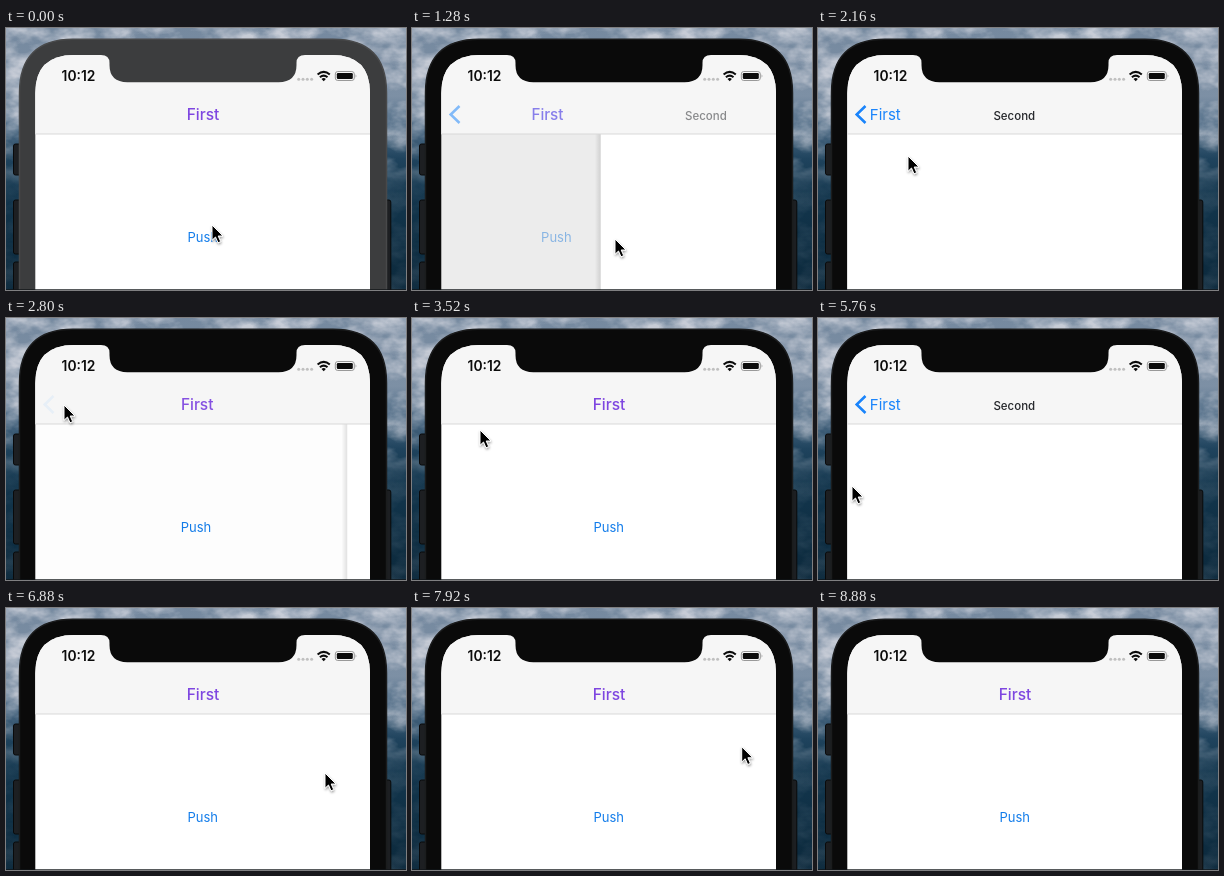
Recreate the animation shown at these times as an HTML page. Size 400 by 262 pixels, loop 8.96 s.

```html
<!DOCTYPE html>
<html lang="en">
<head>
<meta charset="utf-8">
<title>Push and pop</title>
<style>
  html, body { margin: 0; width: 100%; height: 100%; overflow: hidden; }
  svg { display: block; width: 100vw; height: 100vh; }
  text { font-family: Inter, Roboto, sans-serif; text-anchor: middle; }
</style>
</head>
<body>
<svg viewBox="0 0 400 262">
  <defs>
    <linearGradient id="sky" x2="0" y2="1">
      <stop offset="0" stop-color="#75899f"/>
      <stop offset=".26" stop-color="#7d90a5"/>
      <stop offset=".38" stop-color="#4f6c86"/>
      <stop offset=".5" stop-color="#1f435d"/>
      <stop offset=".65" stop-color="#12354c"/>
      <stop offset="1" stop-color="#0c293c"/>
    </linearGradient>
    <linearGradient id="fade" x2="0" y2="1">
      <stop offset=".3" stop-color="#fff"/>
      <stop offset=".6" stop-color="#fff" stop-opacity=".12"/>
    </linearGradient>
    <mask id="high"><rect width="400" height="262" fill="url(#fade)"/></mask>
    <filter id="clouds" x="0" y="0" width="100%" height="100%" color-interpolation-filters="sRGB">
      <feTurbulence type="fractalNoise" baseFrequency=".03 .05" numOctaves="4" seed="7"/>
      <feColorMatrix values="0 0 0 0 .78  0 0 0 0 .8  0 0 0 0 .84  2.6 0 0 0 -1"/>
    </filter>
    <linearGradient id="edge">
      <stop offset="0" stop-color="#000" stop-opacity="0"/>
      <stop offset="1" stop-color="#000" stop-opacity=".12"/>
    </linearGradient>
    <filter id="drop" x="-50%" y="-50%" width="200%" height="200%">
      <feDropShadow dx="0.5" dy="1.5" stdDeviation="1.2" flood-opacity=".4"/>
    </filter>
    <clipPath id="screen"><path d="M29.300 262V65Q29.300 27 68 27H326Q364 27 364 65V262Z"/></clipPath>
  </defs>

  <rect width="400" height="262" fill="url(#sky)"/>
  <g mask="url(#high)"><rect width="400" height="262" filter="url(#clouds)"/></g>

  <g fill="#1d1f22" stroke="#090a0b">
    <rect x="7.5" y="116" width="9" height="31" rx="2"/>
    <rect x="7.5" y="172" width="9" height="54" rx="2"/>
    <rect x="7.5" y="234" width="9" height="40" rx="2"/>
    <rect x="377" y="172" width="7.8" height="100" rx="2"/>
  </g>
  <path id="bezel" d="M13.500 264V65Q13.500 11.300 67 11.300H327Q380.500 11.300 380.500 65V264Z" stroke-width="1.500"/>

  <g clip-path="url(#screen)">
    <rect x="29" y="26" width="335" height="236" fill="#fff"/>
    <text id="push" y="214.400" font-size="13" fill="#127cea">Push</text>
    <rect id="dim" x="29" y="106" width="335" height="156"/>
    <g id="page">
      <rect x="-6" y="106" width="6" height="156" fill="url(#edge)"/>
      <rect y="106" width="335" height="156" fill="#fff"/>
    </g>
    <rect x="29" y="26" width="335" height="80" fill="#f6f6f6"/>
    <rect x="29" y="105.500" width="335" height="1" fill="#dadada"/>
    <path id="chevron" d="M47.500 78L38.700 86.500L47.500 95" fill="none" stroke="#1a84fb" stroke-width="2.600"/>
    <text id="first" y="92">First</text>
    <text id="second" y="91.800" font-size="11.500" font-weight="500" fill="#25272b">Second</text>
  </g>
  <path id="notch" d="M95 26V27Q103.500 27 103.500 35V37Q103.500 54.200 121.500 54.200H272.500Q290.500 54.200 290.500 37V35Q290.500 27 299 27V26Z"/>

  <text x="72.500" y="53" font-size="13.800" font-weight="600" fill="#0b0b0b">10:12</text>
  <g fill="#c0c0c0">
    <circle cx="292.700" cy="51.300" r="1.500"/><circle cx="297" cy="51.300" r="1.500"/>
    <circle cx="301.300" cy="51.300" r="1.500"/><circle cx="305.600" cy="51.300" r="1.500"/>
  </g>
  <g fill="none" stroke="#0b0b0b" stroke-width="2">
    <path d="M311.600 46.600Q317.700 41.200 323.800 46.600"/>
    <path d="M313.900 49.300Q317.700 46 321.500 49.300"/>
    <path d="M315.500 50.900Q317.700 49.200 319.900 50.900L317.700 53.200Z" fill="#0b0b0b" stroke="none"/>
  </g>
  <rect x="329.300" y="43.500" width="19" height="9" rx="2.500" fill="none" stroke="#999"/>
  <rect x="330.800" y="45" width="16" height="6" rx="1.200" fill="#0b0b0b"/>
  <path d="M349.600 46.300Q351.400 48 349.600 49.700Z" fill="#999"/>

  <rect y="261" width="400" height="1" fill="#101418" opacity=".7"/>
  <path id="cursor" d="M0 0V15.300L3.500 12L6 17.800L8.700 16.600L6.200 11H11Z" fill="#000" stroke="#fff" stroke-width="1" filter="url(#drop)"/>
</svg>
<script>
const LOOP = 8960, STEP = 80, WIDTH = 335, LEFT = 29;
const PUSHES = [1184, 4621], POP = 2560, GRAB = 5760, RELEASE = 6400, ACTIVE = 720;

// Pointer stops: time, x, y
const STOPS = [
  [0, 206, 197], [240, 206, 197], [900, 203, 211], [1440, 203, 211],
  [2120, 90, 128], [2200, 90, 128], [2460, 58, 87], [3200, 58, 87],
  [3520, 68, 112], [4320, 202, 207], [4880, 202, 207],
  [5600, 34, 168], [GRAB, 34, 168], [RELEASE, 319, 165],
  [7200, 319, 165], [8000, 330, 138], [8560, 330, 138], [8800, 334, -24], [LOOP, 334, -24]
];

const $ = id => document.getElementById(id);
const [bezel, notch, push, dim, page, chevron, first, second, cursor] =
  ["bezel", "notch", "push", "dim", "page", "chevron", "first", "second", "cursor"].map($);
const set = (el, attrs) => { for (const k in attrs) el.setAttribute(k, attrs[k]); };
const mix = (a, b, k) => a + (b - a) * k;
const clamp = v => Math.min(1, Math.max(0, v));

// Critically damped spring used by the navigation transition
function spring(ms) {
  const w = 18.26 * Math.max(0, ms) / 1000;
  return w > 9.1 ? 1 : 1 - (1 + w) * Math.exp(-w);
}

function pointer(t) {
  const i = Math.max(1, STOPS.findIndex(s => s[0] > t));
  const [t0, x0, y0] = STOPS[i - 1], [t1, x1, y1] = STOPS[i];
  const u = (t - t0) / (t1 - t0), k = u * u * (3 - 2 * u);
  return [mix(x0, x1, k), mix(y0, y1, k)];
}

// 0 = first screen, 1 = second screen
function progress(t) {
  const dragged = x => clamp(1 - (x - 34) / WIDTH);
  if (t < POP) return spring(t - PUSHES[0]);
  if (t < PUSHES[1]) return 1 - spring(t - POP);
  if (t < GRAB) return spring(t - PUSHES[1]);
  if (t < RELEASE) return dragged(pointer(t)[0]);
  return dragged(319) * (1 - spring(t - RELEASE));
}

// Button opacity: dimmed while held down, then fading back
function pressed(t) {
  return PUSHES.some(p => t >= p - 100 && t < p) ? 0.3
    : Math.min(...PUSHES.map(p => t < p ? 1 : mix(0.3, 1, clamp((t - p) / 450))));
}

function draw(t) {
  const p = progress(t), [x, y] = pointer(t);
  const shell = t >= ACTIVE ? "#0a0a0a" : "#3c3d3e";
  set(bezel, { fill: shell, stroke: t >= ACTIVE ? "#1b1c1d" : "#48494a" });
  set(notch, { fill: shell });
  set(push, { x: 196.700 - 100 * p, opacity: pressed(t) });
  set(dim, { opacity: 0.14 * p });
  set(page, { transform: `translate(${LEFT + WIDTH * (1 - p)})`, opacity: p > 0.001 ? 1 : 0 });
  set(chevron, { opacity: p });
  const rgb = [[126, 70, 224], [26, 132, 251]];
  set(first, {
    x: mix(197, 67.300, p ** 1.15),
    fill: `rgb(${rgb[0].map((c, i) => mix(c, rgb[1][i], p * p))})`,
    opacity: 1 - p * (1 - p),
    "font-size": mix(15.500, 15, p),
    "font-weight": p > 0.8 ? 400 : 500
  });
  set(second, { x: mix(401, 196.300, p), opacity: p });
  set(cursor, { transform: `translate(${x} ${y})` });
}

const start = performance.now();
function tick() {
  const t = (performance.now() - start) % LOOP;
  draw(Math.floor(t / STEP) * STEP);
  requestAnimationFrame(tick);
}
tick();
</script>
</body>
</html>
```
